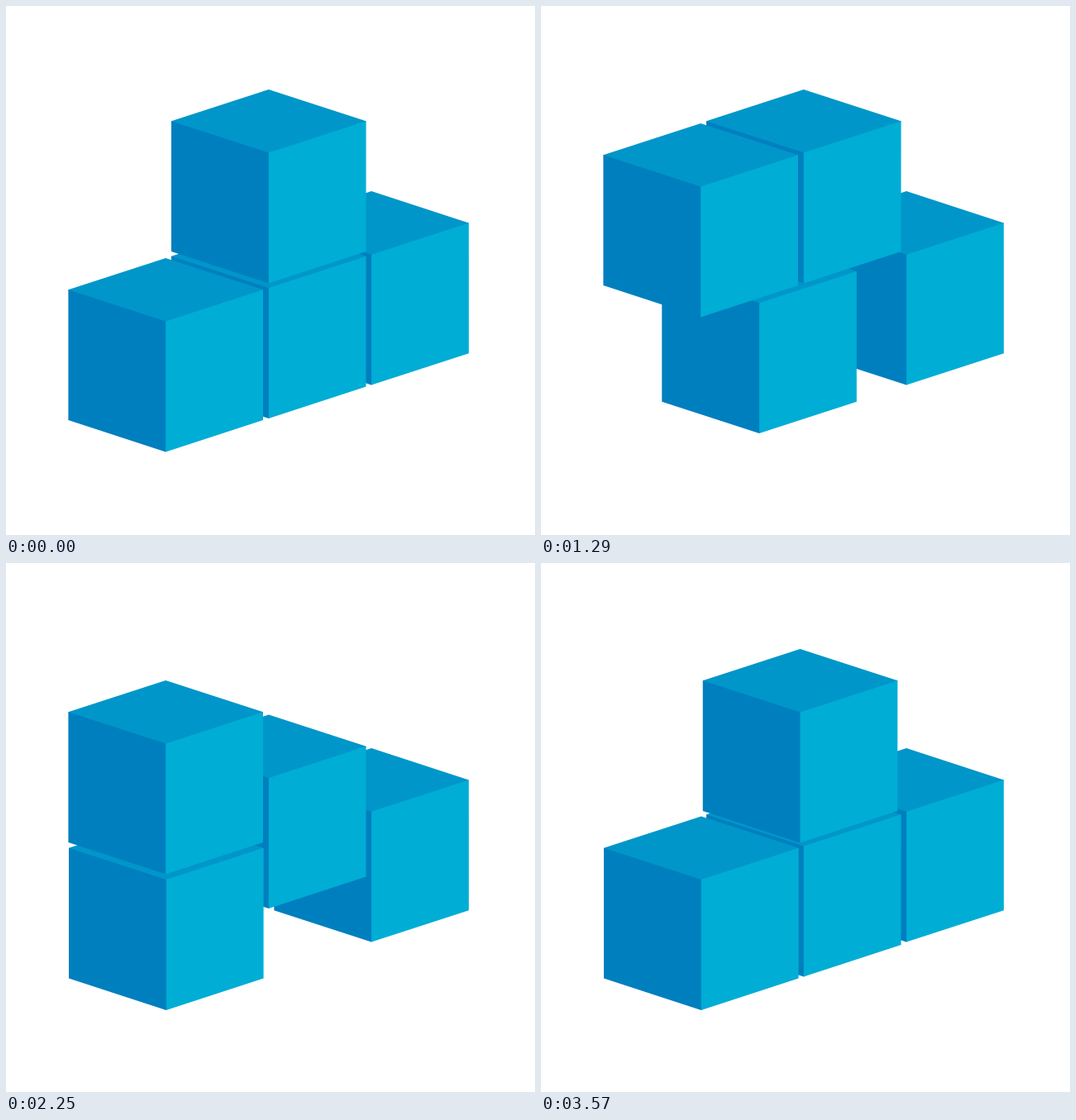
An HTML page with a canvas for the animation above (3.6 s loop, 640 by 640 pixels).

```html
<!DOCTYPE html>
<html lang="en">
<head>
<meta charset="utf-8">
<title>Moving cubes</title>
<style>
  html, body { margin: 0; width: 100%; height: 100%; overflow: hidden; background: #fff; }
  canvas { display: block; width: 640px; height: 640px; }
</style>
</head>
<body>
<canvas width="640" height="640"></canvas>
<script>
const ctx = document.querySelector('canvas').getContext('2d');
const LOOP = 3600, PHASE = 900, STEP = 30;
const HALF = 117.8, RISE = 38.3, HEIGHT = 157.8;
const COLORS = { top: '#0096c9', left: '#007fbf', right: '#00add5' };

// Each cube is placed by its rearmost top corner and makes at most one move, then waits.
const still = { from: [442.1, 224.1] };
const base = { from: [317.8, 264.5], to: [193.8, 306.5], phase: 1 };
const tower = { from: [317.8, 101], to: [317.8, 266], phase: 2 };
const lifter = { from: [193.2, 305], to: [193.2, 142], phase: 0, then: [317.7, 102.7], thenPhase: 3 };

const progress = (t, phase) => Math.min(1, Math.max(0, t / PHASE - phase));
const mix = (a, b, p) => a.map((v, i) => v + (b[i] - v) * p);

function position(cube, t) {
  if (!cube.to) return cube.from;
  const first = mix(cube.from, cube.to, progress(t, cube.phase));
  return cube.then ? mix(first, cube.then, progress(t, cube.thenPhase)) : first;
}

function face(color, points) {
  ctx.fillStyle = color;
  ctx.beginPath();
  points.forEach(([x, y]) => ctx.lineTo(x, y));
  ctx.fill();
}

function drawCube([x, y]) {
  const l = x - HALF, r = x + HALF, side = y + RISE, front = y + 2 * RISE;
  // Faces overlap by a pixel to hide antialiasing seams.
  face(COLORS.top, [[x, y], [r, side], [r, side + 1], [x, front + 1], [l, side + 1], [l, side]]);
  face(COLORS.left, [[l, side], [x, front], [x + 1, front], [x + 1, front + HEIGHT - 0.5],
    [x, front + HEIGHT], [l, side + HEIGHT]]);
  face(COLORS.right, [[x, front], [r, side], [r, side + HEIGHT], [x, front + HEIGHT]]);
}

function draw(t) {
  ctx.clearRect(0, 0, 640, 640);
  const middle = t < 2 * PHASE ? [base, tower] : [tower, base];
  [still, ...middle, lifter].forEach(cube => drawCube(position(cube, t)));
}

const start = performance.now();
function tick() {
  const t = (performance.now() - start + 1) % LOOP;
  draw(Math.floor(t / STEP) * STEP);
  requestAnimationFrame(tick);
}
tick();
</script>
</body>
</html>
```
